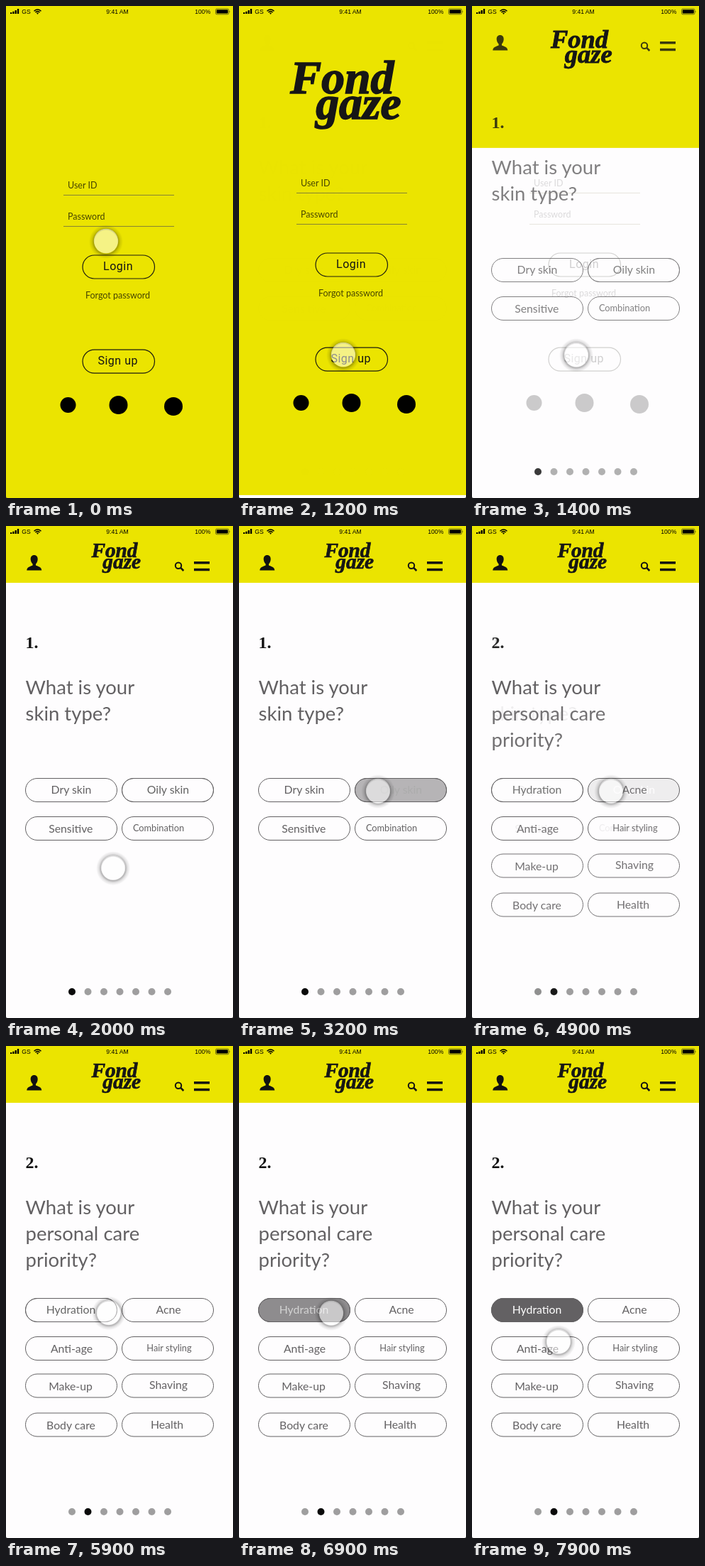
An HTML page for the animation above (8000 ms loop, 320 by 693 pixels).

```html
<!DOCTYPE html>
<html lang="en">
<head>
<meta charset="utf-8">
<title>Skin care onboarding</title>
<style>
  html, body { margin: 0; width: 100%; height: 100%; overflow: hidden; background: #fefdfe; }
  svg { display: block; width: 100%; height: 100%; }
  text { font-family: Lato, "Open Sans", sans-serif; fill: #636163; }
  .question { font-size: 27.5px; }
  .option { font-size: 15.8px; text-anchor: middle; }
  .small { font-size: 12.8px; }
  .box { fill: none; stroke: #636163; stroke-width: 1; }
  .number { font: bold 24px "Liberation Serif", serif; fill: #111; }
  .field { font-size: 12.5px; fill: #000; fill-opacity: .7; }
  .action { font: 16px Roboto, sans-serif; letter-spacing: .5px; text-anchor: middle; fill: #151515; }
  .pill { fill: none; stroke: #1c1c10; stroke-width: 1.2; }
  .rule { stroke: #777440; stroke-width: .9; }
  .status text { font: 8.6px "Liberation Sans", sans-serif; fill: #000; }
  .brand text { font: italic bold 66px "Liberation Serif", serif; fill: #161616;
    stroke: #161616; stroke-width: 1.6px; }
</style>
</head>
<body>
<svg viewBox="0 0 320 693" preserveAspectRatio="none">
  <defs>
    <radialGradient id="shade">
      <stop offset=".66" stop-color="#000" stop-opacity="0"/>
      <stop offset=".72" stop-color="#000" stop-opacity=".3"/>
      <stop offset=".84" stop-color="#000" stop-opacity=".11"/>
      <stop offset="1" stop-color="#000" stop-opacity="0"/>
    </radialGradient>
  </defs>
  <rect width="320" height="693" fill="#fefdfe"/>
  <rect id="panel" width="320" height="693" fill="#ebe400"/>

  <g id="login">
    <text class="field" x="87" y="254">User ID</text>
    <path class="rule" d="M81 263.4H237M81 307.4H237"/>
    <text class="field" x="87" y="298">Password</text>
    <rect class="pill" x="108" y="348" width="101.5" height="33" rx="16.5"/>
    <text class="action" x="158" y="368.6">Login</text>
    <text class="field" x="157.5" y="409.3" text-anchor="middle">Forgot password</text>
    <rect class="pill" x="108" y="481.2" width="101.5" height="33" rx="16.5"/>
    <text class="action" x="157.7" y="502">Sign up</text>
    <circle cx="87.5" cy="559" r="11"/>
    <circle cx="158.5" cy="559" r="13"/>
    <circle cx="236" cy="561" r="13"/>
  </g>

  <g id="quiz">
    <path d="M39.7 41c3.4 0 5.2 2.6 5 6-.2 3-1.2 5.200-2.700 6.400v2.200c3.500 1.600 8 2.200 8.300 6.900H29.300c.3-4.700 4.800-5.300 8.300-6.900v-2.200c-1.500-1.200-2.700-3.400-2.900-6.400-.2-3.400 1.600-6 5-6z" fill="#111"/>
    <circle cx="243" cy="55.700" r="4.200" fill="none" stroke="#111" stroke-width="2"/>
    <path d="M246 58.700L250.300 63" stroke="#111" stroke-width="2.500"/>
    <path d="M265 51.800H287M265 61.500H287" stroke="#111" stroke-width="3.600"/>
    <text class="question" x="27.500" y="237">What is your</text>
    <g id="common"></g>
    <g id="first"></g>
    <g id="second"></g>
    <g id="dots"></g>
  </g>

  <g id="brand" class="brand">
    <text x="2" y="43.500">Fond</text>
    <text x="38" y="80">gaze</text>
  </g>

  <g class="status">
    <path d="M6 9h2.300v2H6zM9.300 7.700h2.300V11H9.300zM12.600 6h2.300v5h-2.300zM15.900 4h2.300v7h-2.300z"/>
    <text x="22.300" y="10.600">GS</text>
    <g fill="none" stroke="#000" stroke-width="1.500">
      <path d="M39.500 7.200Q44.500 2.900 49.500 7.200M41.400 9Q44.500 6.300 47.600 9"/>
    </g>
    <path d="M42.900 10q1.600-1.200 3.200 0l-1.600 1.700z"/>
    <text x="157" y="10.600" text-anchor="middle">9:41 AM</text>
    <text x="266.300" y="10.600">100%</text>
    <rect x="295.500" y="4" width="18.500" height="7.800" rx="1.800" fill="none" stroke="#222" stroke-width=".6"/>
    <rect x="296.700" y="5.200" width="16.100" height="5.400" rx=".8"/>
    <path d="M314.800 6.500q1.400 1.400 0 2.800z"/>
  </g>
  <path d="M0 690.500Q0 693 2.500 693H0zM320 690.500Q320 693 317.500 693H320z" fill="#555"/>

  <g id="pointer">
    <circle cy="1" r="24" fill="url(#shade)"/>
    <circle r="17.200" fill="#fff" fill-opacity=".52"/>
  </g>
</svg>
<script>
const LOOP = 8000;
const $ = id => document.getElementById(id);
const clamp = v => Math.max(0, Math.min(1, v));
const mix = (a, b, p) => a + (b - a) * p;
const span = (t, from, to) => clamp((t - from) / (to - from));
const quartOut = p => 1 - (1 - p) ** 4;
const inOut = p => p * p * (3 - 2 * p);
const grey = v => `rgb(${v},${v},${v})`;

const COLS = [27.5, 163.5];
const ROWS = [355.5, 409.5, 462, 517];
const box = (col, row, extra = '') =>
  `<rect class="box" x="${COLS[col]}" y="${ROWS[row]}" width="129" height="33" rx="16.5" ${extra}/>`;
const option = (label, x, y, extra = '') =>
  `<text class="option ${extra}" x="${x}" y="${y}">${label}</text>`;
const line = (label, y) => `<text class="question" x="27.500" y="${y}">${label}</text>`;
const number = n => `<text class="number" x="27.500" y="172">${n}.</text>`;
const chosen = (id, col) => box(col, 0, `id="${id}" style="fill:#636163"`);

$('common').innerHTML = [0, 1].map(r => box(0, r) + box(1, r)).join('');

$('first').innerHTML = number(1) + line('skin type?', 274) + chosen('oilyFill', 1) +
  option('Dry skin', 92, 377) +
  option('<tspan id="oilyText">Oily skin</tspan>', 228.5, 377) +
  option('Sensitive', 91.3, 432) +
  option('Combination', 215, 430.3, 'small');

$('second').innerHTML = number(2) + line('personal care', 274) + line('priority?', 311) +
  chosen('hydraFill', 0) +
  [2, 3].map(r => box(0, r) + box(1, r)).join('') +
  option('<tspan id="hydraText">Hydration</tspan>', 91.5, 377) +
  option('Acne', 229, 377) +
  option('Anti-age', 92.5, 432) +
  option('Hair styling', 230, 430.3, 'small') +
  option('Make-up', 91, 484.6) +
  option('Shaving', 229, 483.4) +
  option('Body care', 91.5, 539.6) +
  option('Health', 227, 539);

$('dots').innerHTML = Array.from({ length: 7 }, (_, i) =>
  `<circle cx="${93 + i * 22.5}" cy="656" r="5" fill="#9f9e9f"/>`).join('');
const dots = $('dots').children;

// Pointer moves: start, end, x, y
const START = [141, 331];
const MOVES = [
  [50, 900, 147, 491],
  [1850, 2700, 196, 373],
  [5450, 6100, 130, 376],
  [7150, 7900, 122, 416]
];

function pointerAt(t) {
  let [x, y] = START;
  for (const [from, to, nx, ny] of MOVES) {
    const p = inOut(span(t, from, to));
    x = mix(x, nx, p);
    y = mix(y, ny, p);
  }
  return [x, y];
}

function select(name, p) {
  $(name + 'Fill').style.fillOpacity = p;
  $(name + 'Text').style.fill = grey(mix(99, 255, p));
}

function draw(t) {
  const settle = quartOut(span(t, 50, 400));
  const open = quartOut(span(t, 1200, 1800));
  const next = quartOut(span(t, 4550, 5350));

  $('login').setAttribute('transform', `translate(0 ${mix(3, 0, settle)})`);
  $('login').style.opacity = 1 - open;
  $('quiz').style.opacity = open;
  $('panel').setAttribute('height', mix(693, 80, open));

  $('brand').style.opacity = span(t, 50, 600);
  $('brand').setAttribute('transform',
    `translate(${mix(70, 119.5, open)} ${mix(80, 24.5, open)}) scale(${mix(1, .444, open)})`);

  $('first').style.opacity = 1 - next;
  $('second').style.opacity = next;
  select('oily', span(t, 3000, 3430));
  select('hydra', span(t, 6600, 7020));
  dots[0].style.fill = grey(mix(10, 159, next));
  dots[1].style.fill = grey(mix(159, 10, next));

  $('pointer').setAttribute('transform', `translate(${pointerAt(t)})`);
}

const origin = performance.now();
function tick() {
  draw((performance.now() - origin) % LOOP);
  requestAnimationFrame(tick);
}
draw(0);
requestAnimationFrame(tick);
</script>
</body>
</html>
```
